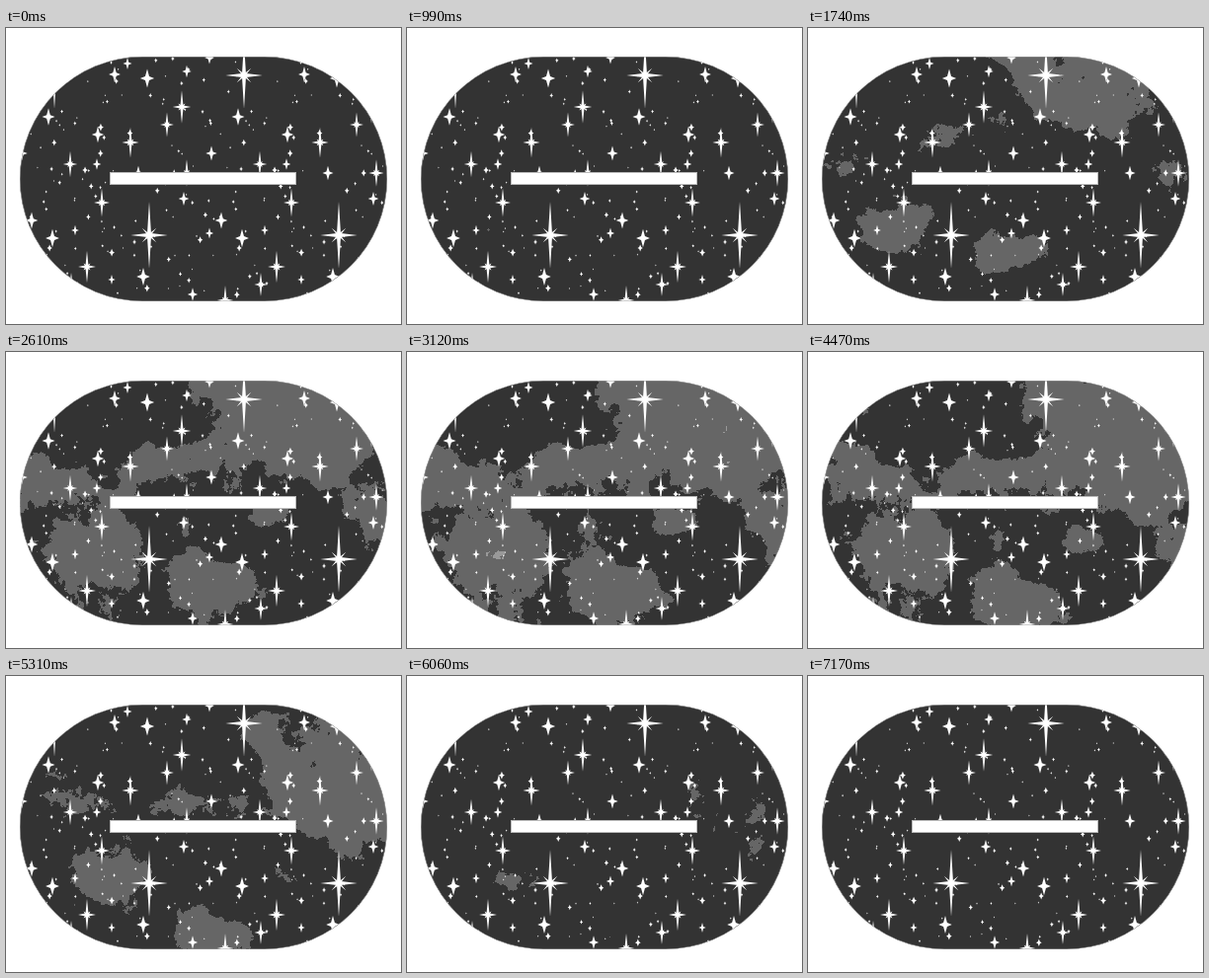
Animation of 400x300 px, one loop 7200 ms. Source, as an HTML page with a canvas:

```html
<!DOCTYPE html>
<html lang="en">
<head>
<meta charset="utf-8">
<title>Starfield</title>
<style>
  html, body { margin: 0; width: 100%; height: 100%; overflow: hidden; background: #fff; }
  canvas { display: block; }
</style>
</head>
<body>
<canvas id="stage" width="400" height="300"></canvas>
<script>
const LOOP = 7200, STEP = 30, TILE = 192;
const X0 = 14, Y0 = 29, W = 372, H = 248;
const ctx = document.getElementById('stage').getContext('2d');

function newCanvas(w, h) {
  const c = document.createElement('canvas');
  c.width = w;
  c.height = h;
  return c;
}

function randomFrom(seed) {
  return () => {
    seed = (Math.imul(seed, 1664525) + 1013904223) >>> 0;
    return seed / 4294967296;
  };
}

// Star centres in one tile, from the largest to the smallest.
const flares = [
  [145, 210], [49, 48], [178, 80], [82, 242], [126, 116], [30, 276],
  [97, 177], [183, 147], [65, 138], [163, 98], [66, 260]
];
const sparks = [
  [143, 51], [47, 213], [139, 252], [43, 90], [26, 195], [93, 108],
  [110, 47], [16, 127], [134, 147], [180, 173], [189, 270], [14, 30],
  [183, 44], [123, 36], [92, 138], [14, 208], [70, 205], [107, 255]
];

function spike(g, x, y, rx, ry, waist, angle = 0) {
  g.save();
  g.translate(x, y);
  g.rotate(angle);
  g.beginPath();
  for (let i = 0; i < 8; i++) {
    const a = i * Math.PI / 4, tip = i % 2 === 0;
    g.lineTo(Math.cos(a) * (tip ? rx : waist), Math.sin(a) * (tip ? ry : waist));
  }
  g.fill();
  g.restore();
}

function drawFlare(g, x, y, size) {
  spike(g, x, y, size * 0.55, size, 1.4 + size * 0.04);
  spike(g, x, y, size * 0.3, size * 0.3, 1.6, Math.PI / 4);
}

function drawStars() {
  const c = newCanvas(400, 300), g = c.getContext('2d'), rnd = randomFrom(77);
  const specks = Array.from({ length: 115 }, () => [
    rnd() * TILE, Y0 + rnd() * H, 1 + 3 * rnd() ** 3
  ]);
  g.fillStyle = '#fff';
  for (let dx = -TILE; dx <= 2 * TILE; dx += TILE) {
    flares.forEach(([x, y], i) => drawFlare(g, x + dx, y, i < 2 ? 34 : 18 - i * 0.6));
    sparks.forEach(([x, y], i) => {
      const r = 9.5 - i * 0.27;
      spike(g, x + dx, y, r * 0.75, r, r * 0.3);
    });
    for (const [x, y, r] of specks) spike(g, x + dx, y, r * 0.75, r, r * 0.4);
  }
  return c;
}

// The nebula is one height map: soft blobs roughened by fractal noise.
const MW = 640, MH = 600, MX = -110, MY = -160;
// x, y, radii, strength
const blobs = [
  [325, 103, 58, 46, 74], [300, 25, 48, 32, 52], [222, 38, 26, 34, 55],
  [255, 72, 20, 32, 40], [175, 120, 70, 24, 42], [102, 202, 50, 30, 66],
  [46, 126, 42, 36, 46], [205, 242, 44, 26, 66], [196, 185, 20, 36, 42],
  [270, 177, 26, 15, 42], [380, 185, 32, 34, 42],
  [125, 65, 55, 32, -22], [275, 215, 62, 26, -25]
];

function addNoise(map) {
  const rnd = randomFrom(9), N = 512;
  const lattice = Float32Array.from({ length: N * N }, () => rnd() * 2 - 1);
  const ease = f => f * f * (3 - 2 * f);
  const at = (x, y) => lattice[y * N + x];
  for (let size = 44, amp = 17; size > 1.3; size /= 2, amp *= 0.68) {
    for (let y = 0; y < MH; y++) {
      const iy = Math.floor(y / size), v = ease(y / size - iy);
      for (let x = 0; x < MW; x++) {
        const ix = Math.floor(x / size), u = ease(x / size - ix);
        const top = at(ix, iy) * (1 - u) + at(ix + 1, iy) * u;
        const low = at(ix, iy + 1) * (1 - u) + at(ix + 1, iy + 1) * u;
        map[y * MW + x] += amp * (top * (1 - v) + low * v);
      }
    }
  }
}

function buildNebula() {
  const map = new Float32Array(MW * MH).fill(13);
  for (const [cx, cy, rx, ry, amp] of blobs) {
    for (let y = 0; y < MH; y++) {
      for (let x = 0; x < MW; x++) {
        const d = ((x + MX - cx) / rx) ** 2 + ((y + MY - cy) / ry) ** 2;
        if (d < 6) map[y * MW + x] += amp * Math.exp(-d);
      }
    }
  }
  addNoise(map);
  return map;
}

const nebula = buildNebula(), stars = drawStars();
const cloud = newCanvas(W, H), cloudCtx = cloud.getContext('2d');
const image = cloudCtx.createImageData(W, H);
const pixels = new Uint32Array(image.data.buffer);
const grays = [0xff333333, 0xff666666, 0xff999999, 0xffcccccc];
const PIVOT_X = 90, PIVOT_Y = 257, TURN = 0.58;

// The map turns about a pivot while it fades in and out in four grays.
function drawCloud(t) {
  const opacity = 1 - Math.abs(2 * t / LOOP - 1);
  const angle = TURN * (t / LOOP - 0.5);
  const c = Math.cos(angle), s = Math.sin(angle);
  for (let y = 0; y < H; y++) {
    const dy = y + Y0 - PIVOT_Y;
    for (let x = 0; x < W; x++) {
      const dx = x + X0 - PIVOT_X;
      const mx = Math.round(PIVOT_X + dx * c + dy * s - MX);
      const my = Math.round(PIVOT_Y - dx * s + dy * c - MY);
      const level = Math.round(opacity * nebula[my * MW + mx] / 51);
      pixels[y * W + x] = grays[Math.max(0, Math.min(3, level))];
    }
  }
  cloudCtx.putImageData(image, 0, 0);
}

const badge = new Path2D();
badge.roundRect(X0, Y0, W, H, H / 2);

function render(t) {
  drawCloud(t);
  ctx.fillStyle = '#fff';
  ctx.fillRect(0, 0, 400, 300);
  ctx.save();
  ctx.clip(badge);
  ctx.drawImage(cloud, X0, Y0);
  ctx.drawImage(stars, 0, 0);
  ctx.strokeStyle = '#999';
  ctx.stroke(badge);
  ctx.restore();
  ctx.fillStyle = '#bbb';
  ctx.fillRect(105, 146, 189, 13);
  ctx.fillStyle = '#fff';
  ctx.fillRect(106, 147, 187, 11);
}

let shown = -1;
function tick() {
  const t = Math.floor(performance.now() % LOOP / STEP) * STEP;
  if (t !== shown) render(shown = t);
  requestAnimationFrame(tick);
}
tick();
</script>
</body>
</html>
```
